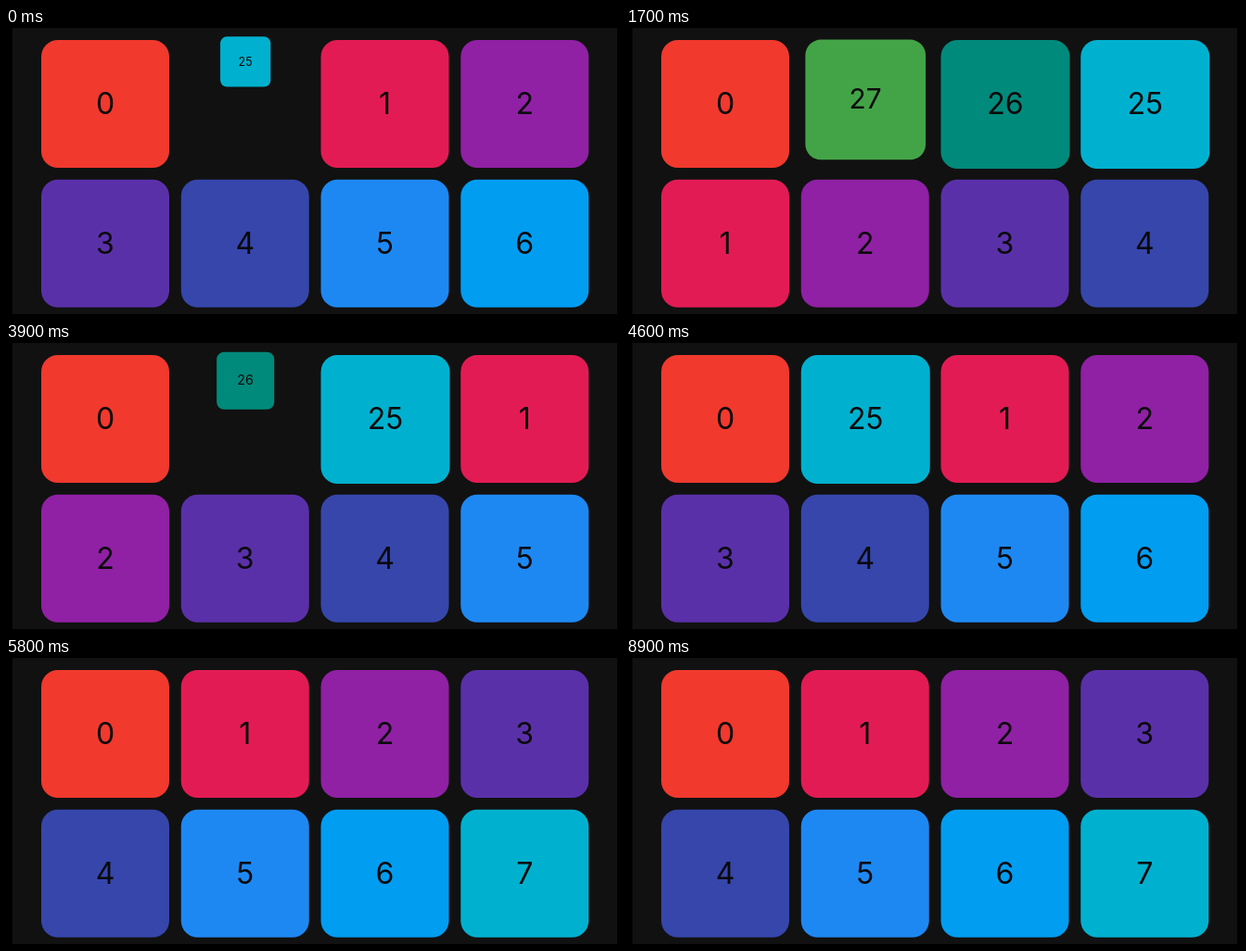
These frames come from a looping animation (662x310 px, 9000 ms). An HTML page:

```html
<!DOCTYPE html>
<html lang="en">
<head>
<meta charset="utf-8">
<title>Grid insert and remove</title>
<style>
  html, body { margin: 0; width: 100%; height: 100%; overflow: hidden; background: #000; }
  #panel { position: absolute; left: 7px; top: 0; width: 652px; height: 309px; background: #111; }
  #stage { position: absolute; left: 0; top: 0; width: 662px; height: 310px; overflow: hidden; }
  .cell {
    position: absolute; left: 31.6px; top: 6.5px; width: 150.75px; height: 150.75px;
    transform-origin: 50% 0;
  }
  .tile {
    position: absolute; inset: 6.2px; border-radius: 18px; color: #0a0a0a;
    font: 400 32px/138.4px Inter, Roboto, sans-serif; text-align: center;
  }
</style>
</head>
<body>
<div id="panel"></div>
<div id="stage"></div>
<script>
const LOOP = 9000, STEP = 100, PITCH = 150.75, COLS = 4;
const SCALE_MS = 300, MOVE_MS = 260;
const COLORS = ['#f1392e', '#e31b54', '#9020a4', '#5a30a9', '#3646ab',
                '#1e88f2', '#009df1', '#00b1cf', '#008a7b', '#43a447'];

// Start times: gap opens, tile grows, tile shrinks, gap closes.
const EXTRAS = [
  { n: 25, open: -400, grow: -117, shrink: 5084, close: 5530 },
  { n: 26, open: 365, grow: 650, shrink: 3734, close: 4180 },
  { n: 27, open: 1135, grow: 1420, shrink: 2745, close: 3195 }
];

const stage = document.getElementById('stage');
const ramp = (t, start, ms) => Math.min(1, Math.max(0, (t - start) / ms));
const ease = p => p * p * (3 - 2 * p);

function makeTile(n, color) {
  const cell = document.createElement('div');
  const tile = document.createElement('div');
  cell.className = 'cell';
  tile.className = 'tile';
  tile.textContent = n;
  tile.style.background = color;
  cell.append(tile);
  stage.append(cell);
  return cell;
}

const base = Array.from({ length: 9 }, (_, n) => makeTile(n, COLORS[n]));
for (const e of EXTRAS) e.cell = makeTile(e.n, COLORS[e.n % 18]);

// A fractional slot lies on the straight line between its two neighbours.
function place(cell, slot, scale = 1) {
  const a = Math.floor(slot), p = slot - a;
  const mix = f => (f(a) * (1 - p) + f(a + 1) * p) * PITCH;
  const x = mix(i => i % COLS), y = mix(i => Math.floor(i / COLS));
  cell.style.transform = `translate(${x}px, ${y}px) scale(${scale})`;
  cell.style.visibility = scale > 0 ? 'visible' : 'hidden';
}

function draw(t) {
  let shift = 0;
  for (const e of [...EXTRAS].reverse()) {
    const scale = ramp(t, e.grow, SCALE_MS) - ramp(t, e.shrink, SCALE_MS);
    place(e.cell, 1 + shift, scale);
    shift += ease(ramp(t, e.open, MOVE_MS)) - ease(ramp(t, e.close, MOVE_MS));
  }
  base.forEach((cell, n) => place(cell, n ? n + shift : 0));
}

const start = performance.now();
function tick() {
  const t = (performance.now() - start) % LOOP;
  draw(Math.floor(t / STEP) * STEP);
  requestAnimationFrame(tick);
}
tick();
</script>
</body>
</html>
```
